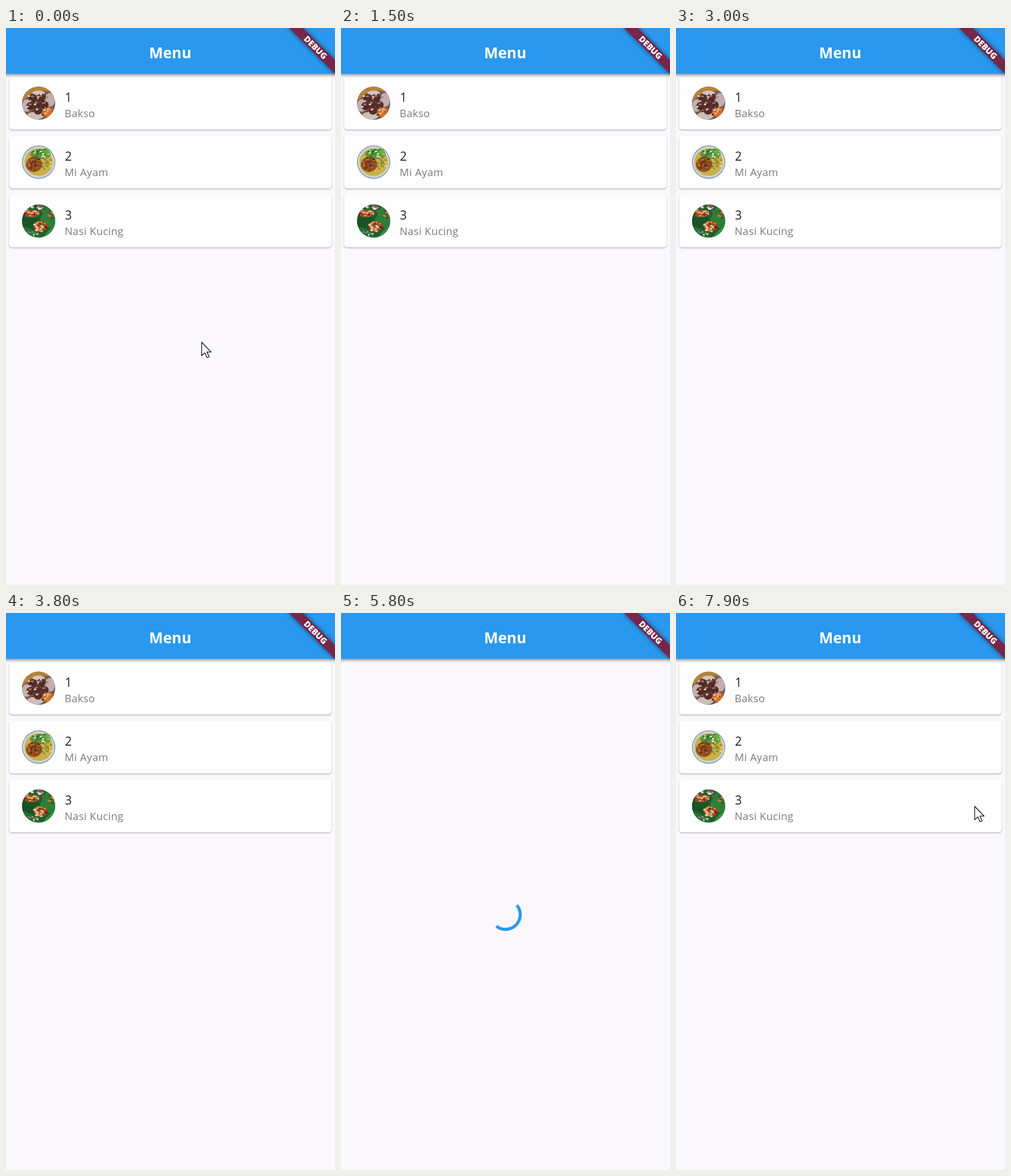
Animation, 575 px wide and 974 px high, one loop 8000 ms. Source, as an HTML page:

```html
<!DOCTYPE html>
<html lang="id">
<head>
<meta charset="utf-8">
<title>Menu</title>
<style>
html, body { margin: 0; width: 100%; height: 100%; overflow: hidden; background: #faf8fc; }
svg { display: block; width: 100vw; height: 100vh; }
filter { color-interpolation-filters: sRGB; }
text { font-family: "Open Sans", "Noto Sans", sans-serif; }
.heading { font-size: 26px; font-weight: 700; fill: #fff; text-anchor: middle; }
.number { font-size: 21px; fill: #202022; }
.dish { font-size: 18.2px; fill: #7b7b7d; letter-spacing: .4px; }
.debug { font-size: 14.6px; font-weight: 800; fill: #fff; text-anchor: middle; }
</style>
</head>
<body>
<svg viewBox="0 0 575 974">
  <defs>
    <clipPath id="round"><circle r="29"/></clipPath>
    <filter id="cardShadow" x="-5%" y="-10%" width="110%" height="125%">
      <feDropShadow dx="0" dy="1.3" stdDeviation=".9" flood-color="#000" flood-opacity=".3"/>
    </filter>
    <filter id="barShadow" x="-5%" y="-10%" width="110%" height="140%">
      <feDropShadow dx="0" dy="2.5" stdDeviation="2.8" flood-color="#000" flood-opacity=".42"/>
    </filter>
    <filter id="bannerShadow" x="-20%" y="-80%" width="140%" height="260%">
      <feDropShadow dx="0" dy="0" stdDeviation="4" flood-color="#000" flood-opacity=".5"/>
    </filter>
  </defs>
  <rect width="575" height="974" fill="#faf8fc"/>
  <g id="list"></g>
  <path id="spinner" fill="none" stroke="#2a98ee" stroke-width="5.4"/>
  <rect x="-12" y="-12" width="599" height="92" fill="#2a98ee" filter="url(#barShadow)"/>
  <text class="heading" x="287" y="52.5">Menu</text>
  <g transform="translate(575 0) rotate(45)">
    <rect x="-57" y="39.7" width="114" height="17" fill="#76264a" filter="url(#bannerShadow)"/>
    <text class="debug" x="0" y="53.4">DEBUG</text>
  </g>
  <path id="cursor" d="M0 0V23.5L5.5 18.6L9.3 27L13 25.3L9.3 17.2H16.5Z"
        fill="#fff" stroke="#111" stroke-width="1.3" stroke-linejoin="round"/>
</svg>
<script>
const LOOP = 8000, STEP = 100;
const SPIN_START = 5530, SPIN_END = 6500;
const CARD_TOP = 85.5, CARD_PITCH = 103;
const $ = id => document.getElementById(id);

let seed = 7;
const random = () => (seed = seed * 16807 % 2147483647) / 2147483647;

const ellipse = (x, y, rx, ry, fill) =>
  `<ellipse cx="${x}" cy="${y}" rx="${rx}" ry="${ry}" fill="${fill}"/>`;
const shape = (d, fill) => `<path d="${d}" fill="${fill}"/>`;

// Scatter small crumbs of the given colours inside an ellipse.
function crumbs(count, x, y, rx, ry, size, colours) {
  return Array.from({ length: count }, () => {
    const a = random() * Math.PI * 2, r = Math.sqrt(random());
    const colour = colours[Math.floor(random() * colours.length)];
    const s = size * (.6 + random() * .7);
    return ellipse((x + Math.cos(a) * rx * r).toFixed(1), (y + Math.sin(a) * ry * r).toFixed(1),
      s.toFixed(1), (s * .7).toFixed(1), colour);
  }).join("");
}

function meatballs() {
  return ellipse(0, 0, 29, 29, "#7c5a50")
    + shape("M-29 -29H29V-17Q8 -27 -14 -16L-29 -4Z", "#b58338")
    + ellipse(-21, 4, 8, 11, "#c4b0ae") + ellipse(20, -6, 9, 12, "#c3adaf")
    + ellipse(-6, 22, 14, 7, "#d0bdb6") + ellipse(0, -18, 11, 4, "#d5c3bd")
    + [[-10, -9], [5, -10], [-3, 2], [10, 3], [-14, 5], [-1, 13]]
      .map(([x, y]) => ellipse(x, y, 7.5, 7, "#552d27") + ellipse(x - 1, y - 3, 3, 1.8, "#9a7168")).join("")
    + ellipse(17, 16, 11, 8, "#d4742a")
    + crumbs(14, 17, 16, 10, 7, 2.2, ["#f0a14a", "#b9531d", "#f3c189"])
    + crumbs(24, -2, 2, 24, 20, 1.8, ["#eadad6", "#3b211e", "#a5837a"]);
}

function noodles() {
  return ellipse(0, 0, 29, 29, "#7d8685") + ellipse(0, 0, 28, 28, "#ccd2d2")
    + ellipse(0, 0, 24.5, 24, "#c9b047")
    + ellipse(3, -14, 18, 9, "#5b9440")
    + crumbs(22, 5, -14, 18, 8, 2.4, ["#2a6f2a", "#5da83f", "#dde2b4"])
    + shape("M8 -20L20 -25L17 -12Z", "#62b436")
    + crumbs(30, 14, 4, 10, 14, 2.3, ["#e8d675", "#a08430", "#d9c252", "#86913b"])
    + ellipse(-8, 4, 14, 13, "#8f4c22")
    + crumbs(38, -8, 4, 14, 13, 2.3, ["#5f2d15", "#c17838", "#8a481d"]);
}

function leafRice() {
  return ellipse(0, 0, 29, 29, "#245c2c")
    + crumbs(30, 4, -20, 25, 9, 2.6, ["#d9bfb7", "#8c5347", "#e8d8d0"])
    + shape("M-29 -13Q-12 -12 1 -5L-2 16L-29 9Z", "#195426")
    + shape("M2 -2L14 -27L29 -18V10L18 12Z", "#2a8038")
    + shape("M-29 9Q-10 12 5 29H-29Z", "#237030")
    + shape("M8 29Q16 14 29 8V29Z", "#348f42")
    + ellipse(-13, -13, 13, 7, "#8f4b24")
    + crumbs(20, -13, -13, 13, 7, 2.2, ["#d98443", "#55260f", "#e7b07a"])
    + ellipse(4, 9, 13, 9, "#914c25")
    + crumbs(24, 4, 9, 12, 9, 2.3, ["#dd8d4c", "#552410", "#ebc49b"])
    + crumbs(9, 20, -11, 5, 8, 2.2, ["#cf7c3c", "#733417"])
    + crumbs(10, -12, 23, 13, 5, 1.8, ["#e0cdc5", "#b58a80"]);
}

const dishes = [
  { name: "Bakso", photo: meatballs, loaded: 6800 },
  { name: "Mi Ayam", photo: noodles, loaded: 7300 },
  { name: "Nasi Kucing", photo: leafRice, loaded: 6900 },
];

$("list").innerHTML = dishes.map(({ name, photo }, i) => `
  <g transform="translate(0 ${CARD_TOP + i * CARD_PITCH})">
    <rect x="5.5" width="563.5" height="92" rx="5.5" fill="#fffefe" filter="url(#cardShadow)"/>
    <g transform="translate(57 46)">
      <circle r="29" fill="#217dcb"/>
      <g class="photo" clip-path="url(#round)">${photo()}</g>
    </g>
    <text class="number" x="103" y="43.5">${i + 1}</text>
    <text class="dish" x="102.5" y="70">${name}</text>
  </g>`).join("");
const photos = document.querySelectorAll(".photo");

const clamp = v => Math.min(1, Math.max(0, v));
const smooth = v => v * v * (3 - 2 * v);
const show = (node, on) => node.setAttribute("visibility", on ? "inherit" : "hidden");

// Cubic bezier (.4, 0, .2, 1), solved by bisection.
function fastOutSlowIn(x) {
  let lo = 0, hi = 1;
  for (let i = 0; i < 24; i++) {
    const s = (lo + hi) / 2, r = 1 - s;
    if (1.2 * r * r * s + .6 * r * s * s + s ** 3 < x) lo = s; else hi = s;
  }
  return 3 * (1 - lo) * lo * lo + lo ** 3;
}

function spinnerArc(ms) {
  const phase = ms / 1333 % 1;
  const head = fastOutSlowIn(clamp(phase * 2)) * 270;
  const tail = fastOutSlowIn(clamp(phase * 2 - 1)) * 270;
  const start = -102 + tail + ms / 2222 * 360 + phase * 90;
  const sweep = Math.max(head - tail, .5);
  const point = deg => {
    const a = deg * Math.PI / 180;
    return `${287.5 + 25.8 * Math.cos(a)} ${527.5 + 25.8 * Math.sin(a)}`;
  };
  return `M${point(start)}A25.8 25.8 0 ${sweep > 180 ? 1 : 0} 1 ${point(start + sweep)}`;
}

const cursorMoves = [
  { from: 0, start: 1200, end: 1500, a: [342, 549.5], b: [580, 520] },
  { from: 6600, start: 6600, end: 7000, a: [330, 974], b: [352, 248] },
  { from: 7000, start: 7100, end: 7800, a: [352, 248], b: [522, 338] },
];

function cursorAt(t) {
  if (t >= 1500 && t < 6600) return null;
  const move = cursorMoves.filter(m => t >= m.from).pop();
  const k = smooth(clamp((t - move.start) / (move.end - move.start)));
  return move.a.map((v, i) => v + (move.b[i] - v) * k);
}

function render(t) {
  const spinning = t >= SPIN_START && t < SPIN_END;
  show($("list"), !spinning);
  show($("spinner"), spinning);
  if (spinning) $("spinner").setAttribute("d", spinnerArc(t - SPIN_START));
  photos.forEach((photo, i) => show(photo, t < SPIN_START || t >= dishes[i].loaded));
  const spot = cursorAt(t);
  show($("cursor"), spot);
  if (spot) $("cursor").setAttribute("transform", `translate(${spot})`);
}

const begin = performance.now();
function tick() {
  const t = (performance.now() - begin) % LOOP;
  render(Math.floor(t / STEP) * STEP);
  requestAnimationFrame(tick);
}
tick();
</script>
</body>
</html>
```
